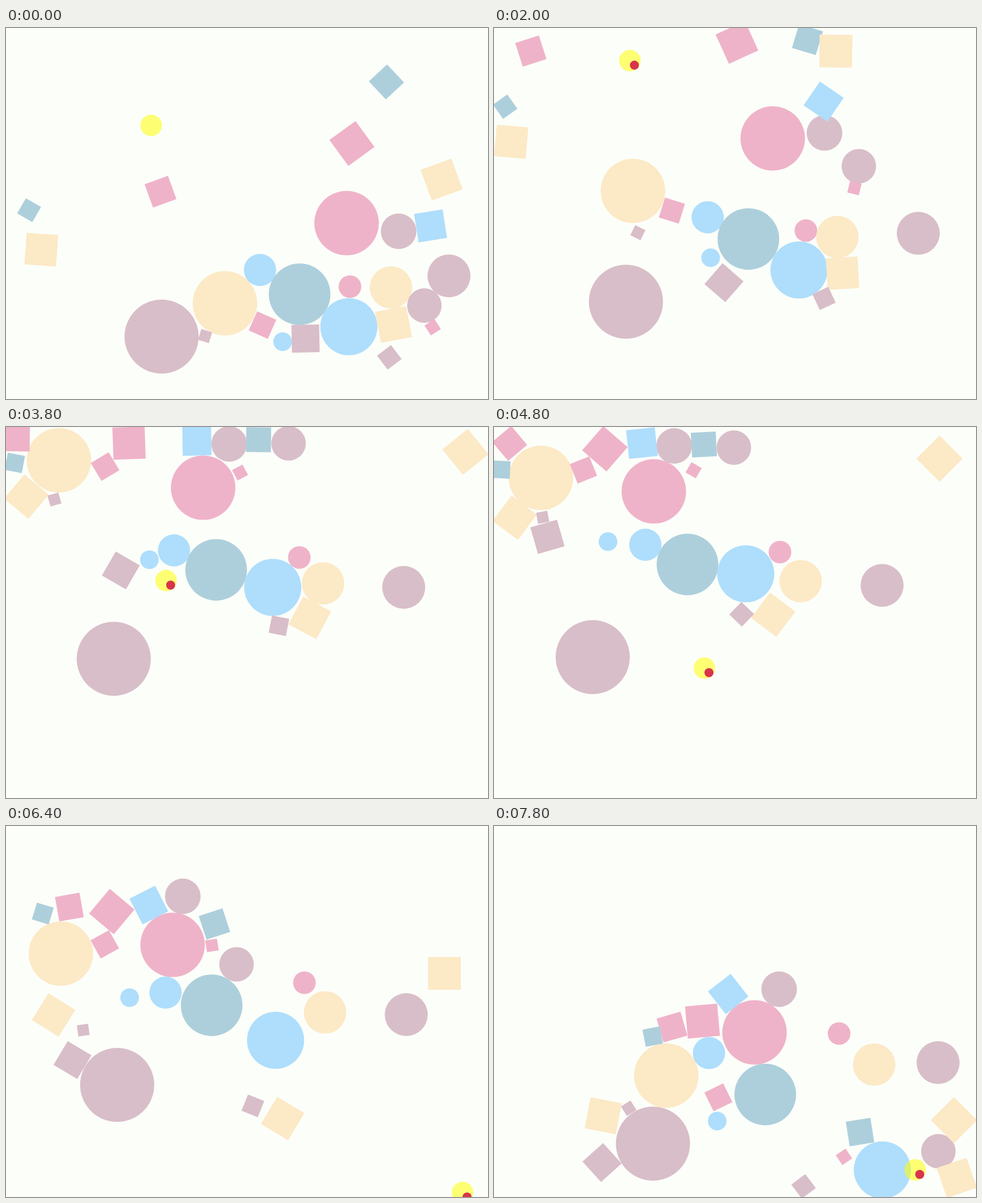
An HTML page without scripts that plays this animation: 852x657 px, repeating every 8 s.

```html
<!DOCTYPE html>
<html lang="en">
<head>
<meta charset="utf-8">
<title>Drifting shapes</title>
<style>
@property --f { syntax: "<number>"; inherits: true; initial-value: 0 }
@property --t0 { syntax: "<number>"; inherits: true; initial-value: 0 }
@property --t1 { syntax: "<number>"; inherits: true; initial-value: 0 }
@property --t2 { syntax: "<number>"; inherits: true; initial-value: 0 }
@property --t3 { syntax: "<number>"; inherits: true; initial-value: 0 }
@property --t4 { syntax: "<number>"; inherits: true; initial-value: 0 }
@property --t5 { syntax: "<number>"; inherits: true; initial-value: 0 }
@property --w0 { syntax: "<number>"; inherits: true; initial-value: 1 }
@property --w1 { syntax: "<number>"; inherits: true; initial-value: 0 }
@property --w2 { syntax: "<number>"; inherits: true; initial-value: 0 }
@property --w3 { syntax: "<number>"; inherits: true; initial-value: 0 }
@property --w4 { syntax: "<number>"; inherits: true; initial-value: 0 }
@property --w5 { syntax: "<number>"; inherits: true; initial-value: 0 }
@property --w6 { syntax: "<number>"; inherits: true; initial-value: 0 }

html, body { margin: 0; width: 100%; height: 100%; overflow: hidden; background: #fcfef9 }
body { animation: play 8s steps(40) infinite }
@keyframes play { from { --f: 0 } to { --f: 40 } }

/* Progress through each span between the seven key poses */
main {
  position: absolute; inset: 0; overflow: hidden;
  --t0: clamp(0, var(--f) / 7, 1);
  --t1: clamp(0, (var(--f) - 7) / 7, 1);
  --t2: clamp(0, (var(--f) - 14) / 5, 1);
  --t3: clamp(0, (var(--f) - 19) / 5, 1);
  --t4: clamp(0, (var(--f) - 24) / 8, 1);
  --t5: clamp(0, (var(--f) - 32) / 7, 1);
}
/* Smooth spline weights: s = step, m = slope at a pose, w = weight of a pose */
section {
  --s0: (var(--t0) * var(--t0) * (3 - 2 * var(--t0)));
  --s1: (var(--t1) * var(--t1) * (3 - 2 * var(--t1)));
  --s2: (var(--t2) * var(--t2) * (3 - 2 * var(--t2)));
  --s3: (var(--t3) * var(--t3) * (3 - 2 * var(--t3)));
  --s4: (var(--t4) * var(--t4) * (3 - 2 * var(--t4)));
  --s5: (var(--t5) * var(--t5) * (3 - 2 * var(--t5)));
  --b0: (7 * var(--t0) * (1 - var(--t0)));
  --b1: (7 * var(--t1) * (1 - var(--t1)));
  --b2: (5 * var(--t2) * (1 - var(--t2)));
  --b3: (5 * var(--t3) * (1 - var(--t3)));
  --b4: (8 * var(--t4) * (1 - var(--t4)));
  --b5: (7 * var(--t5) * (1 - var(--t5)));
  --m0: (var(--b0) * (1 - var(--t0)));
  --m1: (var(--b1) * (1 - var(--t1)) - var(--b0) * var(--t0));
  --m2: (var(--b2) * (1 - var(--t2)) - var(--b1) * var(--t1));
  --m3: (var(--b3) * (1 - var(--t3)) - var(--b2) * var(--t2));
  --m4: (var(--b4) * (1 - var(--t4)) - var(--b3) * var(--t3));
  --m5: (var(--b5) * (1 - var(--t5)) - var(--b4) * var(--t4));
  --m6: (0 - var(--b5) * var(--t5));
  --w0: calc(1 - var(--s0) - var(--m0) * 5 / 28 - var(--m1) / 14);
  --w1: calc(var(--s0) - var(--s1) + var(--m0) * 3 / 14 - var(--m2) / 12);
  --w2: calc(var(--s1) - var(--s2) - var(--m0) / 28 + var(--m1) / 14 - var(--m3) / 10);
  --w3: calc(var(--s2) - var(--s3) + var(--m2) / 12 - var(--m4) / 13);
  --w4: calc(var(--s3) - var(--s4) + var(--m3) / 10 - var(--m5) / 15 + var(--m6) / 30);
  --w5: calc(var(--s4) - var(--s5) + var(--m4) / 13 - var(--m6) * 3 / 14);
  --w6: calc(var(--s5) + var(--m5) / 15 + var(--m6) * 19 / 105);
}
i {
  position: absolute; left: 0; top: 0;
  width: calc(var(--d) * 1px); height: calc(var(--d) * 1px);
  margin: calc(var(--d) * -.5px);
  translate:
    calc(1px * (var(--w0) * var(--x0) + var(--w1) * var(--x1) + var(--w2) * var(--x2) + var(--w3) * var(--x3) + var(--w4) * var(--x4) + var(--w5) * var(--x5) + var(--w6) * var(--x6)))
    calc(1px * (var(--w0) * var(--y0) + var(--w1) * var(--y1) + var(--w2) * var(--y2) + var(--w3) * var(--y3) + var(--w4) * var(--y4) + var(--w5) * var(--y5) + var(--w6) * var(--y6)));
}
.c { border-radius: 50% }
.s { rotate: calc(1deg * (var(--w0) * var(--r0) + var(--w1) * var(--r1) + var(--w2) * var(--r2) + var(--w3) * var(--r3) + var(--w4) * var(--r4) + var(--w5) * var(--r5) + var(--w6) * var(--r6))) }
.mauve { background: #d8bec9 }
.cream { background: #fce9c6 }
.sky { background: #aedefc }
.teal { background: #adcfdc }
.pink { background: #efb3c9 }
.leaves { opacity: clamp(0, 19 - var(--f), 1) }
.enters { opacity: clamp(0, var(--f) - 18, 1) }
.pointer { background: rgb(255 255 0 / .54) }
.pointer::after {
  content: ""; position: absolute; left: 18.5px; top: 18.5px; width: 16px; height: 16px;
  border-radius: 50%; background: #d8344c; opacity: clamp(0, var(--f), 1);
}
</style>
</head>
<body>
<main><section>
<i class="c mauve" style="--d:131;--x0:274.5;--y0:546;--x1:246.5;--y1:508;--x2:213.5;--y2:449.5;--x3:190;--y3:410;--x4:174;--y4:407;--x5:196;--y5:458;--x6:280.5;--y6:562"></i>
<i class="c cream" style="--d:114.5;--x0:387;--y0:487.5;--x1:296.5;--y1:372.5;--x2:173.5;--y2:167;--x3:93.5;--y3:59;--x4:83;--y4:90;--x5:97;--y5:226;--x6:304.5;--y6:442"></i>
<i class="c sky" style="--d:57;--x0:448.5;--y0:428;--x1:402;--y1:371;--x2:341.5;--y2:281;--x3:296.5;--y3:218;--x4:267;--y4:208;--x5:281.5;--y5:294.5;--x6:379.5;--y6:401.5"></i>
<i class="c teal" style="--d:109;--x0:518.5;--y0:471;--x1:473;--y1:411;--x2:415;--y2:317.5;--x3:371;--y3:252.5;--x4:341.5;--y4:243;--x5:363;--y5:317;--x6:479;--y6:475"></i>
<i class="c sky" style="--d:101;--x0:605.5;--y0:528.5;--x1:561;--y1:468;--x2:507.5;--y2:366.5;--x3:471;--y3:283.5;--x4:444.5;--y4:259.5;--x5:476;--y5:379;--x6:686;--y6:608.5"></i>
<i class="c sky" style="--d:33;--x0:488.5;--y0:555;--x1:419.5;--y1:464;--x2:328;--y2:323;--x3:253;--y3:234.5;--x4:201;--y4:202.5;--x5:218;--y5:303.5;--x6:394;--y6:522"></i>
<i class="c pink" style="--d:40;--x0:608;--y0:458;--x1:567;--y1:397.5;--x2:533;--y2:301;--x3:518.5;--y3:231;--x4:505.5;--y4:221.5;--x5:527.5;--y5:277.5;--x6:610;--y6:367.5"></i>
<i class="c cream" style="--d:75;--x0:680;--y0:459;--x1:624.5;--y1:400;--x2:585.5;--y2:327;--x3:560;--y3:276.5;--x4:541.5;--y4:272.5;--x5:563.5;--y5:329.5;--x6:671.5;--y6:422"></i>
<i class="c mauve" style="--d:76;--x0:783;--y0:439;--x1:764;--y1:389.5;--x2:728.5;--y2:327;--x3:703;--y3:284;--x4:686;--y4:280.5;--x5:707.5;--y5:334;--x6:785;--y6:419"></i>
<i class="c mauve" style="--d:61;--x0:739;--y0:491;--x1:685;--y1:364;--x2:581;--y2:80.5;--x3:499;--y3:28.5;--x4:423.5;--y4:36;--x5:407;--y5:244.5;--x6:785;--y6:575.5"></i>
<i class="c pink" style="--d:114.5;--x0:602;--y0:345.5;--x1:535.5;--y1:256;--x2:428.5;--y2:119.5;--x3:348.5;--y3:107.5;--x4:282.5;--y4:114;--x5:294.5;--y5:210.5;--x6:460.5;--y6:365.5"></i>
<i class="c mauve" style="--d:63;--x0:693.5;--y0:359.5;--x1:624.5;--y1:267;--x2:516.5;--y2:73.5;--x3:394;--y3:29.5;--x4:318;--y4:33;--x5:312;--y5:124;--x6:503.5;--y6:288.5"></i>

<i class="s sky" style="--d:51;--x0:750;--y0:350;--r0:-9;--x1:659;--y1:207.5;--r1:26;--x2:464.5;--y2:37;--r2:47;--x3:337;--y3:24.5;--r3:89;--x4:261;--y4:28;--r4:84;--x5:252;--y5:139.5;--r5:63;--x6:413.5;--y6:297;--r6:52"></i>
<i class="s pink" style="--d:57;--x0:611;--y0:204;--r0:-36;--x1:461.5;--y1:37;--r1:-26;--x2:381.5;--y2:35.5;--r2:-21;--x3:217;--y3:28;--r3:-2;--x4:195.5;--y4:38;--r4:41;--x5:186.5;--y5:151;--r5:40;--x6:368;--y6:345;--r6:85"></i>
<i class="s pink" style="--d:43.5;--x0:273;--y0:290;--r0:-20;--x1:110.5;--y1:75.5;--r1:-16;--x2:25;--y2:26;--r2:-18;--x3:20;--y3:21;--r3:1;--x4:28;--y4:29;--r4:50;--x5:112.5;--y5:143.5;--r5:80;--x6:315;--y6:356;--r6:74"></i>
<i class="s pink" style="--d:36.5;--x0:453;--y0:525.5;--r0:24;--x1:365.5;--y1:407.5;--r1:18;--x2:242.5;--y2:198;--r2:23;--x3:175;--y3:69.5;--r3:59;--x4:158;--y4:75.5;--r4:68;--x5:174.5;--y5:209;--r5:61;--x6:396.5;--y6:480;--r6:64"></i>
<i class="s teal" style="--d:44;--x0:672.5;--y0:95.5;--r0:47;--x1:576.5;--y1:28;--r1:26;--x2:525.5;--y2:21.5;--r2:6.5;--x3:446.5;--y3:22.5;--r3:.5;--x4:371;--y4:31;--r4:-3;--x5:368.5;--y5:173.5;--r5:-18;--x6:647;--y6:542;--r6:-9"></i>
<i class="s teal" style="--d:30.5;--x0:40.5;--y0:322;--r0:30;--x1:16;--y1:197.5;--r1:-16;--x2:26.5;--y2:72.5;--r2:-59;--x3:15;--y3:63.5;--r3:-79;--x4:12.5;--y4:75.5;--r4:-87;--x5:64.5;--y5:155;--r5:-73;--x6:280;--y6:372.5;--r6:-11"></i>
<i class="s cream" style="--d:55.5;--x0:62.5;--y0:392.5;--r0:4;--x1:32.5;--y1:269.5;--r1:17;--x2:33;--y2:122;--r2:-20;--x3:36;--y3:123.5;--r3:-50;--x4:36.5;--y4:161;--r4:-53;--x5:84;--y5:335;--r5:-58;--x6:193;--y6:513.5;--r6:-79"></i>
<i class="s mauve" style="--d:19.5;--x0:352;--y0:545.5;--r0:17;--x1:302.5;--y1:449;--r1:36;--x2:177.5;--y2:234.5;--r2:5;--x3:85.5;--y3:128.5;--r3:-16;--x4:86;--y4:160;--r4:-11;--x5:136.5;--y5:361.5;--r5:-8;--x6:238;--y6:500;--r6:-32"></i>
<i class="s mauve" style="--d:49;--x0:529;--y0:549.5;--r0:-1;--x1:455;--y1:496;--r1:-47;--x2:327;--y2:374;--r2:-46;--x3:202.5;--y3:253.5;--r3:-60;--x4:94;--y4:194;--r4:-106;--x5:117;--y5:414;--r5:-59;--x6:190.5;--y6:595.5;--r6:-42"></i>
<i class="s cream" style="--d:56;--x0:685;--y0:525;--r0:-11;--x1:639.5;--y1:463.5;--r1:-10;--x2:582.5;--y2:393;--r2:9;--x3:537;--y3:338;--r3:28;--x4:493.5;--y4:332.5;--r4:37;--x5:489;--y5:518;--r5:31;--x6:818;--y6:623;--r6:71"></i>
<i class="s pink" style="--d:20.5;--x0:754;--y0:529.5;--r0:57;--x1:682.5;--y1:407.5;--r1:15;--x2:559;--y2:114;--r2:25;--x3:413.5;--y3:80;--r3:62;--x4:352.5;--y4:76;--r4:30;--x5:363.5;--y5:211;--r5:-9;--x6:618;--y6:585.5;--r6:-34"></i>
<i class="s mauve" style="--d:30.5;--x0:677;--y0:583;--r0:-37;--x1:614.5;--y1:515;--r1:-14;--x2:538;--y2:425;--r2:-38;--x3:482;--y3:351.5;--r3:11;--x4:437.5;--y4:331;--r4:44;--x5:436;--y5:495;--r5:22;--x6:547;--y6:637.5;--r6:53"></i>

<!-- One square slips out at the top and comes back on the right -->
<i class="s cream leaves" style="--d:58;--x0:770;--y0:268.5;--r0:-20;--x1:634.5;--y1:71.5;--r1:-1;--x2:578.5;--y2:25;--r2:0;--x3:550;--y3:-5;--r3:0;--x4:530;--y4:-30;--r4:0;--x5:0;--y5:0;--r5:0;--x6:0;--y6:0;--r6:0"></i>
<i class="s cream enters" style="--d:58;--x0:840;--y0:30;--r0:-35;--x1:840;--y1:30;--r1:-35;--x2:837;--y2:32;--r2:-35;--x3:812;--y3:44;--r3:-39;--x4:787.5;--y4:56;--r4:-45;--x5:775;--y5:261;--r5:0;--x6:813;--y6:521;--r6:45"></i>

<i class="c pointer" style="--d:37.5;--x0:256.5;--y0:172.5;--x1:239;--y1:77.5;--x2:250;--y2:75;--x3:283;--y3:272;--x4:372;--y4:427;--x5:807;--y5:649;--x6:744.5;--y6:609"></i>
</section></main>
</body>
</html>
```
